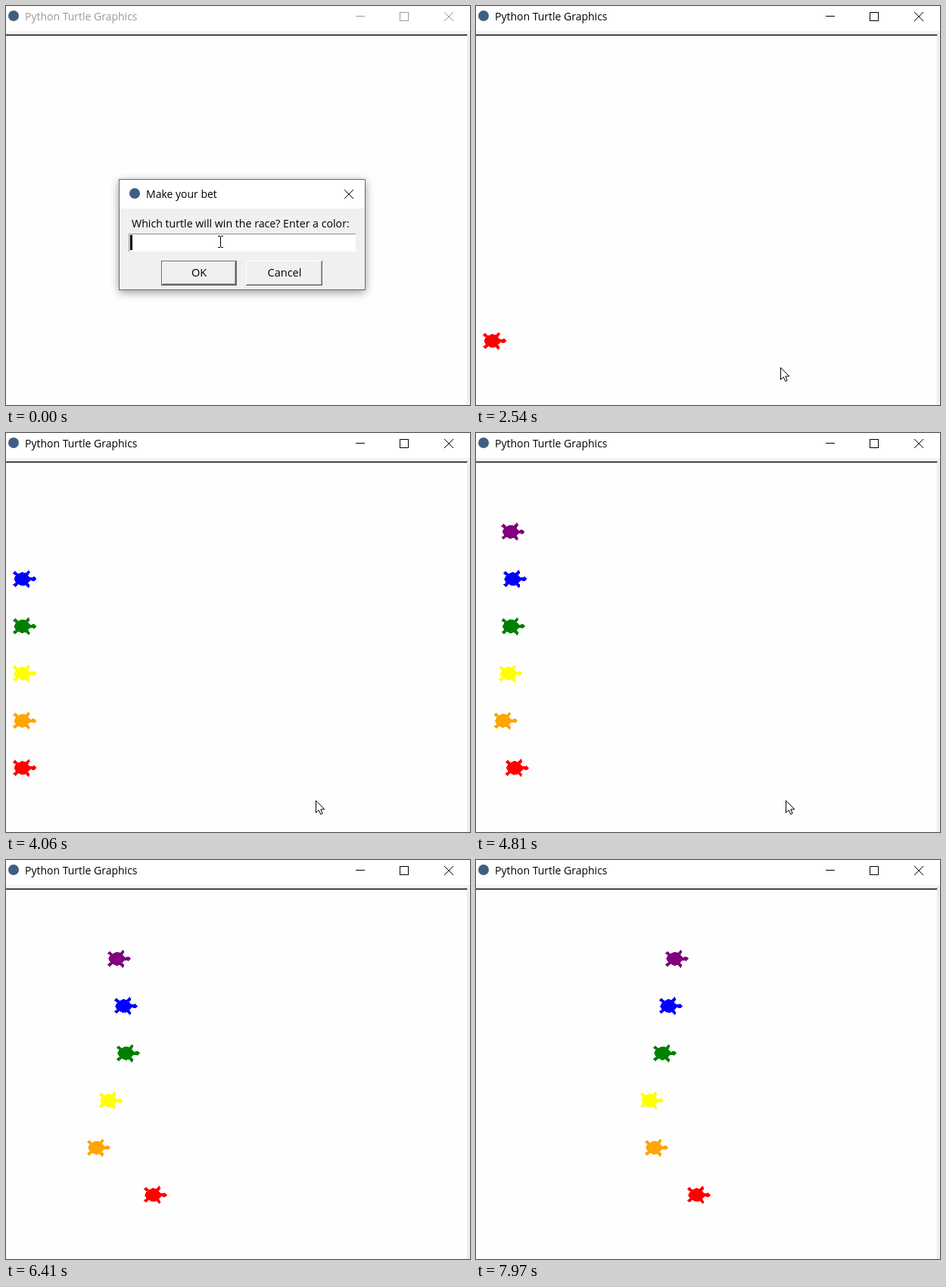
These frames come from a looping animation (613 px wide and 528 px high, 8 s). An HTML page:

```html
<!DOCTYPE html>
<html lang="en">
<head>
<meta charset="utf-8">
<title>Turtle race</title>
<style>
  html, body { margin: 0; width: 100%; height: 100%; overflow: hidden; background: #fefefe; }
  svg { display: block; font-family: "Open Sans", "Noto Sans", sans-serif; font-size: 14px; }
  .crisp { shape-rendering: crispEdges; }
  .line { fill: none; stroke: currentColor; }
  #bar { color: #999; }
  #bar.active { color: #000; }
  #dialog { transform-origin: 312px 303px; }
  #frame { filter: drop-shadow(0 3px 6px rgba(0, 0, 0, .4)); }
</style>
</head>
<body>
<svg width="613" height="528" viewBox="0 0 613 528">
  <defs>
    <g id="cross"><path class="line" d="M-6 -6L6 6M6 -6L-6 6"/></g>
  </defs>

  <rect width="613" height="528" fill="#fefefe"/>
  <g class="crisp">
    <rect width="613" height="33" fill="#fff"/>
    <rect y="33" width="613" height="4" fill="#f4f4f4"/>
    <rect x="610" y="33" width="3" height="495" fill="#f0f0f0"/>
    <rect x="609" y="38" width="1" height="490" fill="#e3e3e3"/>
    <rect y="37" width="610" height="1" fill="#a0a0a0"/>
    <rect y="38" width="609" height="1" fill="#1c1c1c"/>
    <rect y="39" width="609" height="1" fill="#b4b4b4"/>
  </g>
  <circle cx="10" cy="13" r="7" fill="#3f5f80"/>
  <g id="bar">
    <text x="25" y="19" fill="currentColor">Python Turtle Graphics</text>
    <path class="line crisp" d="M462 13.5H474M520.5 8.5H531.5V19.5H520.5Z"/>
    <use href="#cross" x="585" y="14"/>
  </g>

  <g id="turtles" class="crisp"></g>

  <g id="dialog">
    <rect id="frame" class="crisp" x="149.5" y="229.5" width="325" height="146" fill="#f0f0f0" stroke="#6a6a6a"/>
    <rect class="crisp" x="150" y="230" width="324" height="38" fill="#fff"/>
    <circle cx="170" cy="248" r="7" fill="#3f5f80"/>
    <text x="185" y="254">Make your bet</text>
    <use href="#cross" x="453" y="249"/>
    <text x="166" y="293" font-size="14.2">Which turtle will win the race? Enter a color:</text>
    <g class="crisp">
      <rect x="162" y="301" width="300" height="24" fill="#fff"/>
      <path class="line" d="M162.5 325V301.5H462" color="#a0a0a0"/>
      <path class="line" d="M163.5 324V302.5H461" color="#e0e0e0"/>
      <rect x="205.5" y="337.5" width="99" height="32" fill="#f0f0f0" stroke="#696969"/>
      <path class="line" d="M206.5 368V338.5H303" color="#fff"/>
      <path class="line" d="M206 368.5H303.5V338" color="#696969"/>
      <path class="line" d="M207 367.5H302.5V339" color="#a0a0a0"/>
      <path class="line" d="M317.5 369V337.5H417" color="#fff"/>
      <path class="line" d="M317 369.5H417.5V337" color="#696969"/>
      <path class="line" d="M318 368.5H416.5V338" color="#a0a0a0"/>
    </g>
    <text x="255" y="358" font-size="14.5" text-anchor="middle">OK</text>
    <text x="368" y="358" font-size="14.5" text-anchor="middle">Cancel</text>
    <text id="entry" x="165" y="318"></text>
    <rect id="caret" class="crisp" y="303" width="3" height="20"/>
  </g>

  <path id="beam" class="line crisp" d="M-3 -7.5H0M1 -7.5H4M.5 -7V7M-3 7.5H0M1 7.5H4"/>
  <path id="arrow" d="M.5 .5V16.5L4.2 13L6.8 18.6L9.2 17.5L6.8 12H11.8Z" fill="#fff" stroke="#000"/>
</svg>

<script>
const LOOP = 8000, TICK = 68.7, OPEN_END = 2070;
const CENTER = { x: 307.5, y: 287 }, HOME_X = 19.75, FLIGHT = 5.5, RACE = 35;
const $ = id => document.getElementById(id);

// One half of the shell outline, mirrored for the other side
const half = [[16, 0], [14, 2], [10, 1], [7, 4], [9, 7], [8, 9], [5, 6], [1, 7],
  [-3, 5], [-6, 8], [-8, 6], [-5, 4], [-7, 0]];
const outline = [...half, ...half.slice(1, -1).reverse().map(([x, y]) => [x, -y])]
  .map(([x, y]) => [x * 1.25, y * 1.25]).join(" ");

// Race keys: [tick, x] after the start
const racers = [
  ["red", [[50, 108.5], [59, 165.5], [63, 192.5], [71, 227.5], [83, 278.5], [86, 289.5]]],
  ["orange", [[47, 54.5], [50, 54.5], [59, 95.5], [63, 117.5], [71, 157.5], [86, 233.5]]],
  ["yellow", [[50, 83.5], [63, 133.5], [83, 204.5], [86, 227.5]]],
  ["green", [[50, 93.5], [63, 156.5], [86, 244.5]]],
  ["blue", [[50, 100.5], [63, 153.5], [86, 252.5]]],
  ["purple", [[50, 92.5], [63, 144.5], [86, 260.5]]]
].map(([color, keys], i) => {
  const el = document.createElementNS("http://www.w3.org/2000/svg", "polygon");
  el.setAttribute("points", outline);
  el.setAttribute("fill", color);
  el.setAttribute("stroke", color);
  $("turtles").append(el);
  return { el, keys: [[RACE, HOME_X], ...keys], y: CENTER.y + 156.25 - 62.5 * i, start: 1.5 + FLIGHT * i };
});

const mouse = [[-11, 283, 312], [-10, 279, 315], [-4, 268, 355], [1, 268, 355],
  [7, 402, 478], [10, 409, 486], [41, 409, 486], [45, 586, 478]];
const typed = [[70, "b"], [340, "bl"], [600, "blu"], [870, "blue"]];

function at(keys, k) {
  if (k <= keys[0][0]) return keys[0].slice(1);
  for (let i = 1; i < keys.length; i++) {
    const a = keys[i - 1], b = keys[i];
    if (k <= b[0]) {
      const f = (k - a[0]) / (b[0] - a[0]);
      return a.slice(1).map((v, j) => v + (b[j + 1] - v) * f);
    }
  }
  return keys[keys.length - 1].slice(1);
}

const show = (el, on) => { el.style.display = on ? "" : "none"; };
const move = (el, x, y) => el.setAttribute("transform", `translate(${x} ${y})`);

function drawDialog(t, k) {
  const fade = t < OPEN_END ? 1 : [0.5, 0.15][k] || 0;
  show($("dialog"), fade > 0);
  $("dialog").style.opacity = fade;
  $("dialog").style.transform = fade < 1 ? `scale(${0.94 + 0.06 * fade})` : "";
  $("bar").classList.toggle("active", t >= OPEN_END);
  const [since, word] = typed.filter(e => e[0] <= t).pop() || [0, ""];
  const entry = $("entry");
  if (entry.textContent !== word) entry.textContent = word;
  if (fade) $("caret").setAttribute("x", Math.round(163.5 + (word ? entry.getComputedTextLength() : 0)));
  show($("caret"), (t - since) % 900 < 600);
}

function drawMouse(k) {
  const [x, y] = at(mouse, k).map(Math.round);
  const overEntry = y < 324;
  show($("beam"), overEntry);
  show($("arrow"), !overEntry && k <= 45);
  move($(overEntry ? "beam" : "arrow"), x, y);
}

function drawTurtles(k) {
  for (const { el, keys, y, start } of racers) {
    const f = Math.min(1, (k - start) / FLIGHT);
    show(el, f > 0);
    const x = k > RACE ? at(keys, k)[0] : CENTER.x + (HOME_X - CENTER.x) * f;
    move(el, x, CENTER.y + (y - CENTER.y) * f);
  }
}

function draw(now) {
  const t = now % LOOP;
  const k = Math.floor((t - OPEN_END) / TICK + 0.2);
  drawDialog(t, k);
  drawMouse(k);
  drawTurtles(k);
  requestAnimationFrame(draw);
}
draw(0);
</script>
</body>
</html>
```
